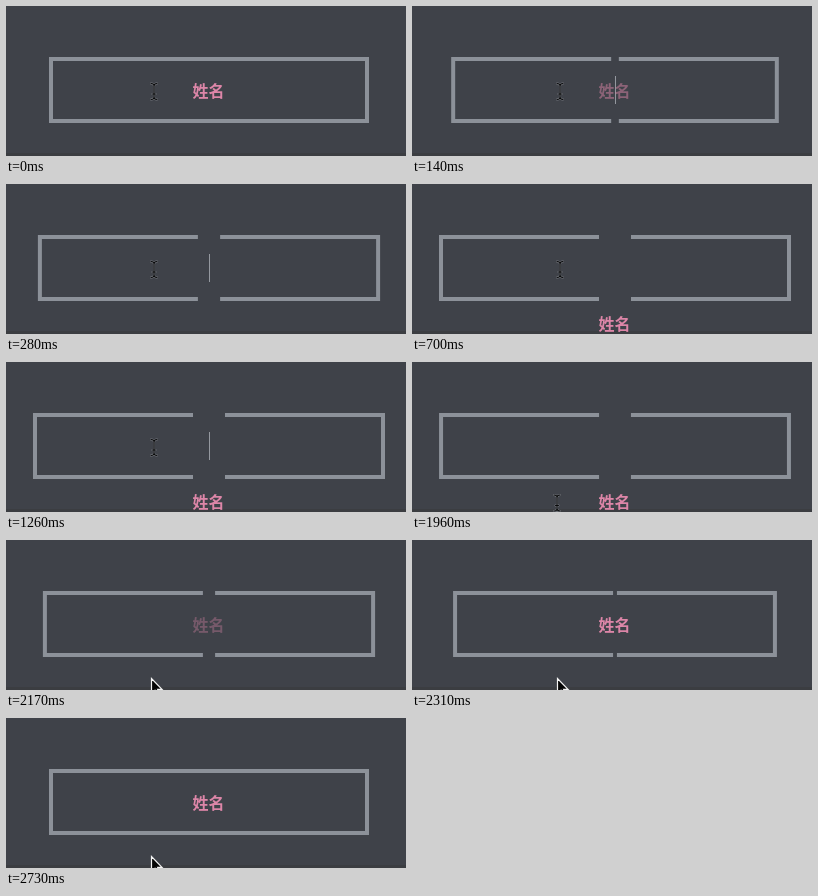
An HTML page that plays this animation: 400x150 px, repeating every 2940 ms.

```html
<!DOCTYPE html>
<html lang="zh">
<head>
<meta charset="utf-8">
<title>Split border input</title>
<style>
  html, body { margin: 0; width: 100%; height: 100%; overflow: hidden; background: #3f4249; }
  svg { display: block; width: 100%; height: 100%; }
  .side { fill: none; stroke: #8c9199; stroke-width: 4; }
  #label {
    font: 700 16px "Noto Sans CJK SC", "Noto Sans CJK", sans-serif;
    fill: #dd86a8;
    text-anchor: middle;
  }
</style>
</head>
<body>
<svg viewBox="0 0 400 150">
  <rect width="400" height="150" fill="#3f4249"/>
  <rect y="147" width="400" height="3" fill="#3b3d41"/>
  <path id="left" class="side" d="M203 53H45V115H203"/>
  <path id="right" class="side" d="M203 53H361V115H203"/>
  <rect id="caret" x="203" y="70" width="1" height="28" fill="#94989f"/>
  <text id="label" x="202.5" y="90.5">姓名</text>
  <g id="beam" fill="none" stroke-linecap="round">
    <path d="M-3-8Q0-8 0-5.500Q0-8 3-8M0-5.500V5.500M-3 8Q0 8 0 5.500Q0 8 3 8M-1.500 2.500H1.500" stroke="#7b7e84" stroke-width="2"/>
    <path d="M-3-8Q0-8 0-5.500Q0-8 3-8M0-5.500V5.500M-3 8Q0 8 0 5.500Q0 8 3 8M-1.500 2.500H1.500" stroke="#08090a" stroke-width="1.1"/>
  </g>
  <path id="arrow" d="M.5.5V15.500L4 12.200L6.400 17.800L9 16.700L6.600 11.300H11Z"
        fill="#050505" stroke="#f4f4f4" stroke-width="1.2"/>
</svg>
<script>
const LOOP = 2940, STEP = 70;
const OPEN = 35, CLOSE = 1955, SLIDE = 600, SPREAD = 16, DROP = 55.5;
const $ = id => document.getElementById(id);
const [left, right, caret, label, beam, arrow] =
  ['left', 'right', 'caret', 'label', 'beam', 'arrow'].map($);

// time, x, y, pointer shape
const pointer = [
  [0, 148, 85.5, beam],
  [1400, 148, 97, beam],
  [1470, 146, 113, beam],
  [1540, 144, 127, arrow],
  [1610, 144, 136, beam],
  [1680, 144.5, 139, beam],
  [1750, 145, 140.5, beam],
  [1820, 145, 141, beam],
  [2030, 145, 138, arrow]
];

const clamp = v => Math.min(1, Math.max(0, v));
const ramp = (t, from, to) => clamp((t - from) / (to - from));
const bezier = (a, b, s) => 3 * a * s * (1 - s) ** 2 + 3 * b * s * s * (1 - s) + s ** 3;

// CSS "ease"
function ease(x) {
  let lo = 0, hi = 1;
  for (let i = 0; i < 24; i++) {
    const mid = (lo + hi) / 2;
    if (bezier(.25, .25, mid) < x) lo = mid; else hi = mid;
  }
  return bezier(.1, 1, lo);
}

const move = (el, x, y) => el.setAttribute('transform', `translate(${x} ${y})`);
const show = (el, on) => el.setAttribute('opacity', +on);

function draw(t) {
  const open = ease(ramp(t, OPEN, OPEN + SLIDE)) - ease(ramp(t, CLOSE, CLOSE + SLIDE));
  move(left, -SPREAD * open, 0);
  move(right, SPREAD * open, 0);

  // the label fades out at one spot and back in at the other
  const down = t >= 280 && t < 2100;
  const fade = t < 1000 ? 1 - ramp(t, 35, 240) + ramp(t, 280, 540)
                        : 1 - ramp(t, 1960, 2100) + ramp(t, 2100, 2300);
  move(label, 0, down ? DROP : 0);
  show(label, fade);

  show(caret, (t >= 140 && t < 700) || (t >= 1260 && t < 1820));

  const [, x, y, shape] = pointer.filter(p => p[0] <= t).pop();
  for (const el of [beam, arrow]) show(el, el === shape);
  move(shape, x, y);
}

const start = performance.now();
function tick() {
  const t = (performance.now() - start) % LOOP;
  draw(Math.floor(t / STEP) * STEP);
  requestAnimationFrame(tick);
}
tick();
</script>
</body>
</html>
```
